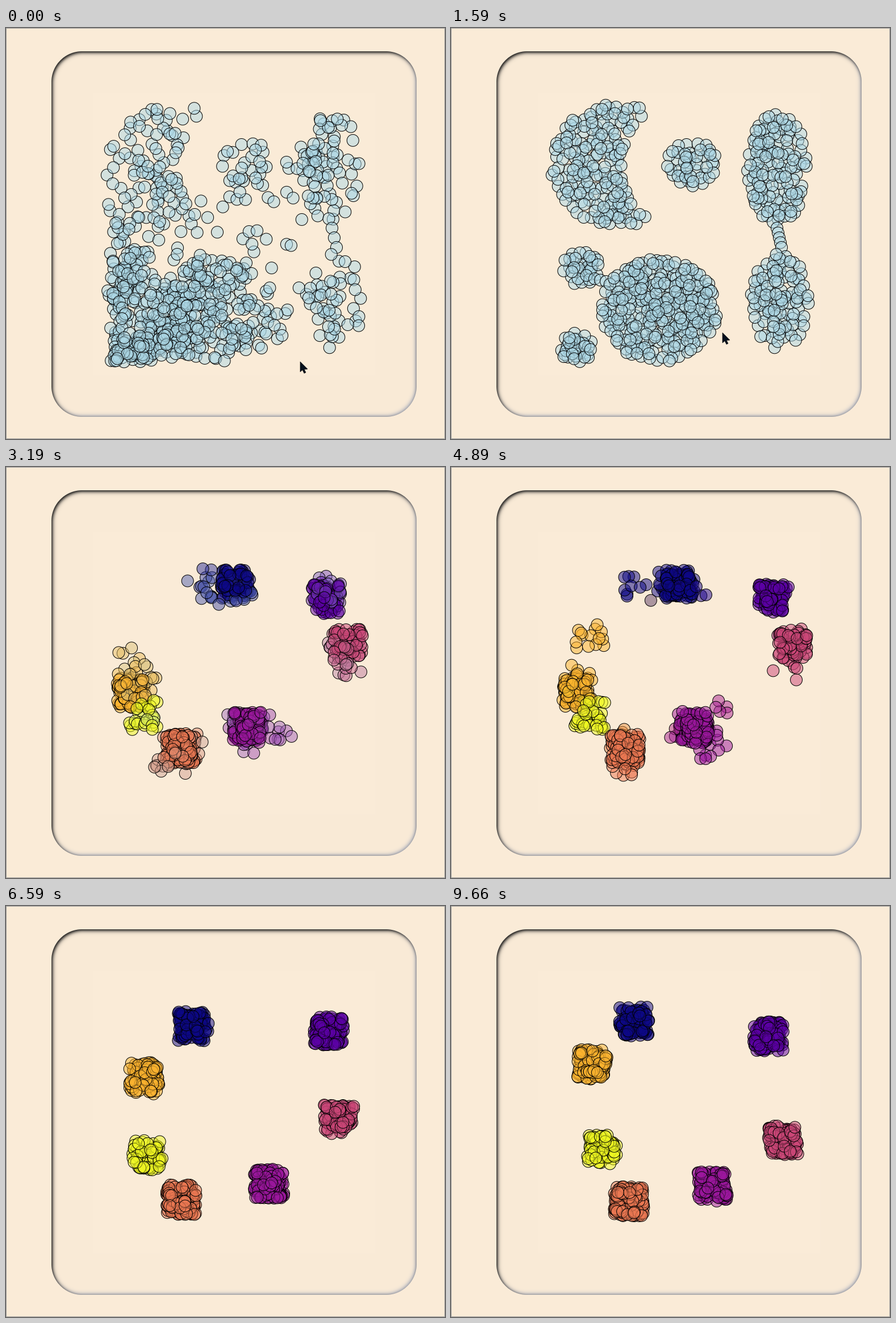
A matplotlib script that plays this animation: 773 by 723 pixels, repeating every 9.76 s.

```python
import math
import numpy as np
import matplotlib
import matplotlib.pyplot as plt
from matplotlib.animation import FuncAnimation
from matplotlib.colors import to_rgb
from matplotlib.patches import Polygon

W, H, DPI = 773, 723, 100
FRAMES, INTERVAL = 80, 122
PX = 72 / DPI
CREAM = np.array(to_rgb("#faebd7"))
rng = np.random.default_rng(11)


# ---- data set: seven blobs and two thin bridges ----
def inside(p, cx, cy, rx, ry):
    return ((p[0] - cx) / rx) ** 2 + ((p[1] - cy) / ry) ** 2 <= 1


def spread(count, test, box, tries=4):
    """Evenly scattered points: keep the candidate farthest from the others."""
    pts = np.full((1, 2), -1e4)
    while len(pts) <= count:
        cands = rng.uniform(box[:2], box[2:], (60, 2))
        cands = np.array([p for p in cands if test(p)][:tries])
        gaps = ((cands[:, None] - pts) ** 2).sum(axis=2).min(axis=1)
        pts = np.vstack([pts, cands[gaps.argmax()]])
    return pts[1:]


def blob(count, cx, cy, rx, ry):
    return spread(count, lambda p: inside(p, cx, cy, rx, ry),
                  (cx - rx, cy - ry, cx + rx, cy + ry))


def in_crescent(p):
    return inside(p, 296, 241, 120, 108) and not inside(p, 397, 241, 97, 110)


data = np.vstack([
    spread(170, in_crescent, (176, 133, 343, 349)),
    blob(34, 230, 422, 33, 30),
    np.linspace((253, 441), (273, 446), 3),
    blob(270, 367, 496, 102, 91),
    blob(127, 575, 247, 53, 96),
    np.linspace((574, 352), (582, 386), 5),
    blob(100, 579, 480, 51, 84),
    blob(45, 425, 239, 46, 39),
    blob(34, 221, 562, 28, 27),
])
n = len(data)

# ---- k-means: every step pulls the dots to their nearest centre ----
centers = np.array([(403, 205), (565, 232), (426, 457), (602, 311),
                    (307, 495), (222, 397), (241, 436)], float)
k = len(centers)
plasma = matplotlib.colormaps["plasma"](np.linspace(0, 1, k))[:, :3]
pale = np.tile(to_rgb("lightblue"), (n, 1))

spots = [np.tile((176.0, 588.0), (n, 1)), data]
tints = [pale, pale]
for _ in range(3):
    label = ((data[:, None] - centers) ** 2).sum(axis=2).argmin(axis=1)
    spots.append(centers[label] + rng.uniform(-26, 26, (n, 2)))
    tints.append(plasma[label])
    centers = np.array([data[label == j].mean(axis=0) for j in range(k)])

starts = [-780, 1980, 4750, 7330]
spans = 330 + 1970 * rng.random((len(starts), n)) ** 1.4
spans[rng.random(spans.shape) < 0.09] = 120


def state(t):
    step = max(i for i, s in enumerate(starts) if t >= s)
    s = np.clip((t - starts[step]) / spans[step], 0, 1)
    u = ((1 - np.cos(math.pi * s)) / 2)[:, None]
    return [a[step] + (a[step + 1] - a[step]) * u for a in (spots, tints)]


# ---- panel with an inset shadow ----
def rounded(x, y, x0=80, y0=41, x1=723, y1=684, r=54):
    """Signed distance to a rounded square, positive inside."""
    qx = np.abs(x - (x0 + x1) / 2) - (x1 - x0) / 2 + r
    qy = np.abs(y - (y0 + y1) / 2) - (y1 - y0) / 2 + r
    out = np.hypot(np.maximum(qx, 0), np.maximum(qy, 0))
    return r - out - np.minimum(np.maximum(qx, qy), 0)


def panel():
    x, y = np.meshgrid(np.arange(W) + 0.5, np.arange(H) + 0.5)
    mask = np.clip(rounded(x, y) + 0.5, 0, 1)
    img = np.tile(CREAM, (H, W, 1))
    for dx, dy, color, blur in ((-2, -2, "#b4b9c8", 2.0), (2, 2.4, "black", 1.9)):
        shade = mask / (1 + np.exp(rounded(x - dx, y - dy) / blur))
        img += (np.array(to_rgb(color)) - img) * shade[..., None]
    img[[0, -1]] = img[:, [0, -1]] = to_rgb("#999999")
    return img


fig = plt.figure(figsize=(W / DPI, H / DPI), dpi=DPI, facecolor=CREAM)
ax = fig.add_axes([0, 0, 1, 1])
ax.imshow(panel(), extent=(0, W, H, 0), interpolation="nearest", aspect="auto")
ax.set_xlim(0, W)
ax.set_ylim(H, 0)
ax.axis("off")

dots = ax.scatter(data[:, 0], data[:, 1], s=(21 * PX) ** 2, c=pale,
                  edgecolors="black", linewidths=PX, zorder=3)
ARROW = np.array([(0, 0), (0, 18), (4, 14.5), (7, 20.5), (10, 19), (7.2, 13.5), (13, 13)])
cursor = ax.add_patch(Polygon(ARROW, fc="#05101c", ec="black", lw=0.5 * PX, zorder=4))


def draw(i):
    t = i * INTERVAL
    pos, rgb = state(t)
    dots.set_offsets(pos)
    dots.set_facecolors(np.column_stack([rgb, np.full(n, 0.5)]))
    u = min(max((t - 200) / 1200, 0), 1)
    u = u * u * (3 - 2 * u)
    cursor.set_xy(ARROW + (518 - 40 * u, 587 - 51 * u))
    cursor.set_visible(t < starts[1])
    return dots, cursor


anim = FuncAnimation(fig, draw, frames=FRAMES, interval=INTERVAL, repeat=True,
                     repeat_delay=0, init_func=lambda: draw(0))
plt.show()
```
